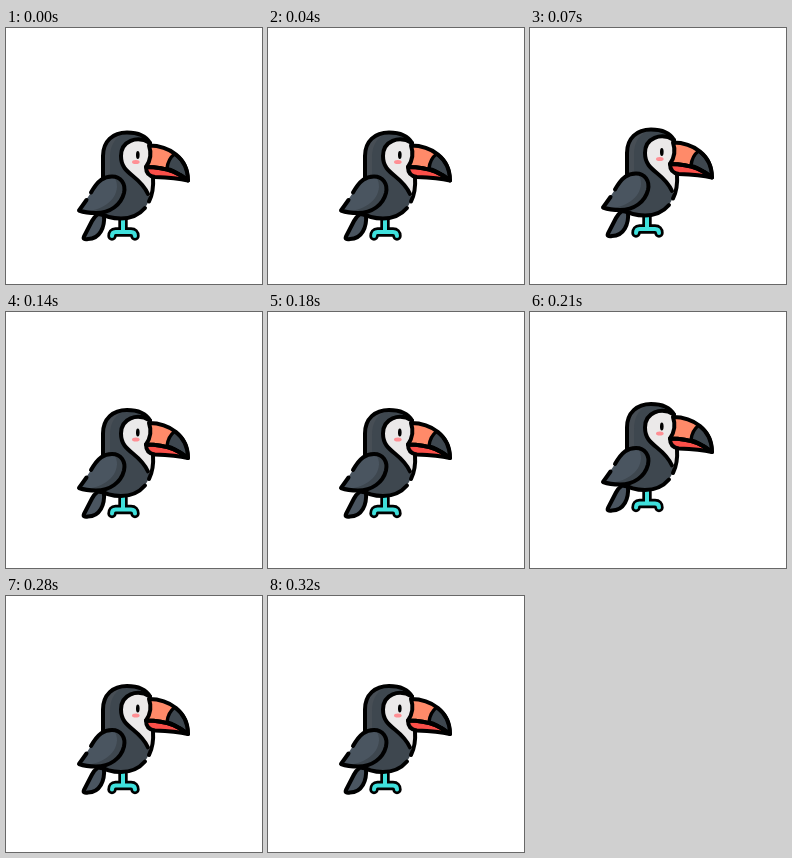
These frames come from a looping animation (256 px wide and 256 px high, 0.35 s). An HTML page with a canvas:

```html
<!DOCTYPE html>
<html lang="en">
<head>
<meta charset="utf-8">
<title>Hopping toucan</title>
<style>
  html, body { margin: 0; width: 100%; height: 100%; overflow: hidden; background: #fff; }
  canvas { display: block; width: 100vw; height: 100vh; }
</style>
</head>
<body>
<canvas width="256" height="256"></canvas>
<script>
const canvas = document.querySelector('canvas');
const ctx = canvas.getContext('2d');

const STEP_MS = 70;
const LIFT = [0, 3, 6.5, 12.5, 14.5];
const INK = '#000', SLATE = '#3e474f', SLATE_LIGHT = '#4a5560', HEAD_EDGE = '#474e55', FACE = '#ebe9e9';
const CORAL = '#ff8a69', RED = '#fb4f49', BLUSH = '#ff8f94', CYAN = '#3fe0dc';

const shapes = {
  tail: 'M98 187 C99 199 94 211 82 211 Q76.5 212 78 208.5 L86 193 Q88 189 92 186 Z',
  body: 'M97 152 V128 C97 113 107 104.5 121 104.5 C132 104.5 140 108 144 115 L147 149 C147 177 135 190.5 115 190.5 C103 190.5 95 187 90 182 Z',
  bodyLine: 'M97 150 V128 C97 113 107 104.5 121 104.5 C132 104.5 140 108 144 115 M147 149 Q148 164 143 173.5 M139 180 C133 187 125 190.5 115 190.5 C106 190.5 98 188 92 184',
  face: 'M144 115 C131 107 115 113 115 128 C115 147 133 146 142 166 L144 171 Q148 160 147 149 Z',
  faceLine: 'M144 115 C131 107 115 113 115 128 C115 147 133 146 142 166',
  wing: 'M73 182.5 L86 163 C92 152 98 148.5 106 148.5 C115 148.5 120 156 118 165 C115 177 104 185 90 185 Q80 185 73 182.5 Z',
  wingLine: 'M85 164.5 C92 152 98 148.5 106 148.5 C115 148.5 120 156 118 165 C115 177 104 185 90 185 Q80 185 73 182.5 L80.5 172',
  wingShade: 'M108 149 C117 150 120 157 118 165 C115 177 104 185 90 185 Q82 185 76 183.5 C96 183 110 173 111 159 Q111 153 108 149 Z',
  upperBeak: 'M143 117.5 C163 117.5 182 130 182 152.5 C175 147 164 139 140 139 Q147 129 143 117.5 Z',
  beakTip: 'M168.5 126 C178 132 182 141 182 152.5 C176 148 170 143 161 140.5 Q162 131 168.5 126 Z',
  lowerBeak: 'M140 139 C164 139 175 147 182 152.5 C171 150 162 149.5 149 149 Q140 148 140 139 Z',
  headEdge: 'M97 150 V128 C97 113 107 104.5 121 104.5 C110 108 104 116 104 130 V149 Z',
  feet: 'M117 192 V204 M106 208 Q106 204 109.5 204 H125 Q129 204 129 208'
};
for (const name in shapes) shapes[name] = new Path2D(shapes[name]);

function fill(shape, color) {
  ctx.fillStyle = color;
  ctx.fill(shape);
}

function line(shape, width = 4, color = INK) {
  ctx.lineWidth = width;
  ctx.strokeStyle = color;
  ctx.stroke(shape);
}

function ellipse(x, y, rx, ry, color) {
  ctx.beginPath();
  ctx.ellipse(x, y, rx, ry, 0, 0, Math.PI * 2);
  ctx.fillStyle = color;
  ctx.fill();
}

function drawToucan() {
  line(shapes.feet, 9.4);
  line(shapes.feet, 4, CYAN);
  fill(shapes.tail, SLATE_LIGHT);
  line(shapes.tail);
  fill(shapes.body, SLATE);
  fill(shapes.headEdge, HEAD_EDGE);
  fill(shapes.face, FACE);
  line(shapes.faceLine);
  line(shapes.bodyLine);
  fill(shapes.lowerBeak, RED);
  fill(shapes.upperBeak, CORAL);
  fill(shapes.beakTip, SLATE);
  line(shapes.beakTip, 3.4);
  line(shapes.lowerBeak);
  line(shapes.upperBeak);
  fill(shapes.wing, SLATE_LIGHT);
  fill(shapes.wingShade, SLATE);
  line(shapes.wingLine);
  ellipse(131.8, 127, 1.8, 3.9, INK);
  ellipse(129.8, 134, 3.8, 2, BLUSH);
}

function render() {
  const scale = Math.min(innerWidth, innerHeight) / 256 * devicePixelRatio;
  const w = Math.round(innerWidth * devicePixelRatio);
  const h = Math.round(innerHeight * devicePixelRatio);
  if (canvas.width !== w || canvas.height !== h) {
    canvas.width = w;
    canvas.height = h;
  }
  const step = Math.floor(performance.now() / STEP_MS) % LIFT.length;
  ctx.setTransform(1, 0, 0, 1, 0, 0);
  ctx.fillStyle = '#fff';
  ctx.fillRect(0, 0, w, h);
  ctx.setTransform(scale, 0, 0, scale, 0, -LIFT[step] * scale);
  ctx.lineCap = ctx.lineJoin = 'round';
  drawToucan();
  requestAnimationFrame(render);
}
render();
</script>
</body>
</html>
```
